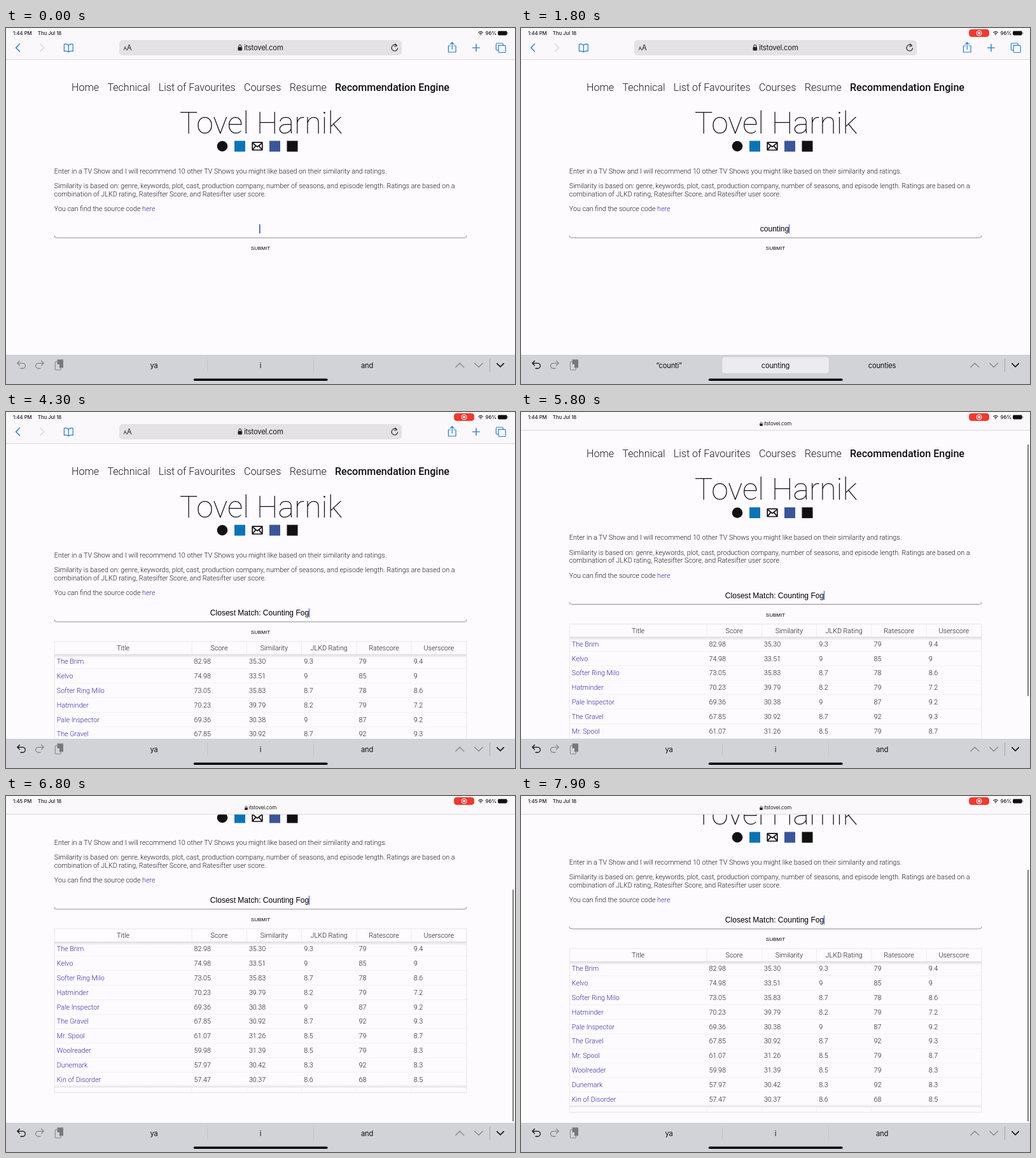
Animation, 800 px wide and 560 px high, one loop 8000 ms. Source, as an HTML page:

```html
<!DOCTYPE html>
<html lang="en">
<head>
<meta charset="utf-8">
<title>Recommendation Engine</title>
<style>
  html, body { margin: 0; width: 100%; height: 100%; overflow: hidden; background: #fefbfe; }
  svg { display: block; width: 800px; height: 560px; }
  text { white-space: pre; fill: #1c1b1d; }
  .body { font: 300 10.72px Roboto, sans-serif; }
  .nav { font: 300 16.08px Roboto, sans-serif; }
  .nav.on { font-weight: 500; fill: #0c0c0d; }
  .name { font: 100 48.2px Roboto, sans-serif; fill: #111; }
  .link { fill: #3529a8; }
  .field { font: 12.06px "Liberation Sans", Arial, sans-serif; fill: #000; }
  .submit { font: 8.04px "Liberation Sans", Arial, sans-serif; fill: #000; }
  .status { font: 500 7.8px Inter, sans-serif; letter-spacing: -.05px; }
  .url { font: 400 11.4px Inter, sans-serif; letter-spacing: -.25px; }
  .small { font: 400 8px Inter, sans-serif; letter-spacing: -.15px; }
  .hint { font: 400 11.2px Inter, sans-serif; letter-spacing: -.2px; fill: #111; }
  .mid { text-anchor: middle; }
  .line { fill: none; stroke-linecap: round; stroke-linejoin: round; }
</style>
</head>
<body>
<svg id="stage" viewBox="0 0 800 560">
  <defs>
    <linearGradient id="down" x1="0" y1="0" x2="0" y2="1">
      <stop offset="0" stop-color="#000" stop-opacity=".13"/>
      <stop offset="1" stop-color="#000" stop-opacity="0"/>
    </linearGradient>
    <linearGradient id="up" x1="0" y1="1" x2="0" y2="0">
      <stop offset="0" stop-color="#000" stop-opacity=".1"/>
      <stop offset="1" stop-color="#000" stop-opacity="0"/>
    </linearGradient>
  </defs>
  <rect width="800" height="560" fill="#fefbfe"/>

  <g id="page">
    <g id="nav"></g>
    <text class="name mid" x="400.5" y="165.6">Tovel Harnik</text>
    <circle cx="340" cy="186" r="8.3" fill="#111"/>
    <rect x="359" y="177.5" width="17" height="17" fill="#0c74b4"/>
    <g class="line" stroke="#111" stroke-width="1.7">
      <rect x="387.2" y="179.8" width="15.6" height="12.2" rx=".6"/>
      <path d="M387.6 181 L395 186.8 L402.4 181 M387.6 191.4 L392.6 185.4 M402.4 191.4 L397.4 185.4"/>
    </g>
    <rect x="414" y="177.5" width="17" height="17" fill="#3b5598"/>
    <rect x="441.5" y="177.5" width="17" height="17" fill="#111"/>
    <g id="copy"></g>
    <path d="M76 326.5 Q76 330 79.5 330 H720.5 Q724 330 724 326.5" fill="none" stroke="#8d8b90" stroke-width="1"/>
    <text id="field" class="field mid" x="398.5" y="320"></text>
    <rect id="caret" y="308.8" height="14.4" fill="#4560d2"/>
    <text class="submit mid" x="400" y="349.4">SUBMIT</text>
    <g id="table"></g>
  </g>
  <rect id="thumb" x="795.9" width="2.2" rx="1.1" fill="#828184"/>

  <rect id="bar" width="800" height="50" fill="#faf8fb"/>
  <rect id="edge" width="800" height=".8" fill="#d3d0d5"/>
  <text id="clock" class="status" x="11" y="11"></text>
  <text class="status" x="49.8" y="11">Thu Jul 18</text>
  <text class="status" x="753.6" y="11">96%</text>
  <g class="line" stroke="#222" stroke-width="1.1">
    <path d="M742.6 7.2 Q746 4 749.4 7.2 M744.2 8.9 Q746 7.2 747.8 8.9"/>
  </g>
  <circle cx="746" cy="10.5" r=".8" fill="#222"/>
  <rect x="773" y="4.8" width="14.6" height="6.6" rx="1.8" fill="#111"/>
  <rect x="788.3" y="6.9" width="1" height="2.4" rx=".5" fill="#777"/>
  <g id="pill">
    <rect x="704" y="2" width="32" height="12" rx="4.5" fill="#f0392f"/>
    <circle cx="720" cy="8" r="4" fill="none" stroke="#fff" stroke-width="1"/>
    <circle cx="720" cy="8" r="2" fill="#fff"/>
  </g>

  <g id="tools">
    <rect x="178" y="19" width="444" height="24" rx="5.5" fill="#e4e2e5"/>
    <g class="line" stroke="#2b7bd0" stroke-width="1.4">
      <path d="M21.5 25 L15.6 31 L21.5 37"/>
      <path d="M53.6 25 L59.5 31 L53.6 37" stroke="#d9d7db"/>
      <path d="M98.3 27 Q95 24.2 91.4 25.6 V36.6 Q95 35.3 98.3 37.8 Q101.6 35.3 105.2 36.6 V25.6 Q101.6 24.2 98.3 27 V37.6" stroke-width="1.2"/>
      <path d="M698.4 28 H695.4 V38 H707 V28 H704 M701.2 33.5 V23 M698.3 25.6 L701.2 22.6 L704.1 25.6" stroke-width="1.2"/>
      <path d="M738.9 25.5 V36.7 M733.3 31.1 H744.5"/>
      <path d="M774 27.4 H783.4 Q785.2 27.4 785.2 29.2 V36.7 Q785.2 38.5 783.4 38.5 H775.8 Q774 38.5 774 36.7 Z" stroke-width="1.2"/>
      <path d="M773.6 35 H772 Q770.3 35 770.3 33.3 V25.8 Q770.3 24 772 24 H779.6 Q781.3 24 781.3 25.8 V27" stroke-width="1.2"/>
      <path d="M614.4 28 A4.8 4.8 0 1 0 615.6 31.5 M611.6 24.8 L614.5 27.9 L610.8 29.2" stroke="#222" stroke-width="1.1"/>
    </g>
    <text class="small" x="184.4" y="35">A</text>
    <text class="url" x="189.8" y="35">A</text>
    <g id="lock">
      <rect x="364.5" y="30" width="6.6" height="5.6" rx="1" fill="#222"/>
      <path d="M365.9 30.4 V28.4 A1.9 1.9 0 0 1 369.7 28.4 V30.4" fill="none" stroke="#222" stroke-width="1.1"/>
    </g>
    <text class="url mid" x="404.8" y="35">itstovel.com</text>
  </g>
  <g id="compact">
    <use href="#lock" transform="translate(117.5 -1.6) scale(.707 .66)"/>
    <text class="small mid" x="403.2" y="21.2">itstovel.com</text>
  </g>

  <rect y="514" width="800" height="46" fill="#d1d3d9"/>
  <g class="line" stroke="#86888e" stroke-width="1.3">
    <path id="undo" d="M21.4 523.8 L17.8 527.3 L21.4 530.8 M18 527.3 H26.2 A4.1 4.1 0 0 1 26.2 535.5 H23"/>
    <path d="M55.6 523.8 L59.2 527.3 L55.6 530.8 M59 527.3 H50.8 A4.1 4.1 0 0 0 50.8 535.5 H54"/>
    <path d="M706.8 533.5 L713.2 527.3 L719.6 533.5 M736.6 527.3 L743 533.5 L749.4 527.3"/>
    <path d="M771.8 527.8 L777 533 L782.2 527.8" stroke="#111" stroke-width="1.7"/>
    <path d="M760.5 520.5 V540.5" stroke="#a5a7ad" stroke-width="1"/>
    <rect x="77.3" y="525" width="9" height="13" rx="1.2" stroke-width="1.1"/>
  </g>
  <path d="M80.5 521.5 H90 V534.5 H84 V529 H80.5 Z" fill="#76787e"/>
  <rect id="glow" x="316.3" y="517.8" width="167.4" height="25.2" rx="4" fill="#ecebf0"/>
  <path id="splits" d="M316.5 520.5 V540.5 M483.5 520.5 V540.5" stroke="#c1c3c9" stroke-width="1"/>
  <g id="hints"></g>
  <rect x="294.8" y="551.4" width="210.8" height="3.6" rx="1.8" fill="#000"/>
</svg>

<script>
const LOOP = 8000, STEP = 100;
const $ = id => document.getElementById(id);

function add(parent, tag, attrs, text) {
  const el = document.createElementNS('http://www.w3.org/2000/svg', tag);
  for (const key in attrs) el.setAttribute(key, attrs[key]);
  if (text) el.textContent = text;
  parent.appendChild(el);
  return el;
}
const label = (parent, cls, x, y, text) => add(parent, 'text', { class: cls, x, y }, text);
const box = (parent, x, y, width, height, fill) => add(parent, 'rect', { x, y, width, height, fill });
const show = (el, on) => el.setAttribute('opacity', +on);

[['Home', 103], ['Technical', 159.4], ['List of Favourites', 239.7], ['Courses', 374], ['Resume', 445.8]]
  .forEach(([text, x]) => label($('nav'), 'nav', x, 98.8, text));
label($('nav'), 'nav on', 517, 98.8, 'Recommendation Engine');

[
  ['Enter in a TV Show and I will recommend 10 other TV Shows you might like based on their similarity and ratings.', 228.7],
  ['Similarity is based on: genre, keywords, plot, cast, production company, number of seasons, and episode length. Ratings are based on a', 252.1],
  ['combination of JLKD rating, Ratesifter Score, and Ratesifter user score.', 264.9],
  ['You can find the source code ', 288.4]
].forEach(([text, y]) => label($('copy'), 'body', 75.8, y, text));
add($('copy').lastChild, 'tspan', { class: 'link' }, 'here');

// results table
const ROW = 22.85, TOP = 381, BOTTOM = TOP + 10 * ROW;
const colX = i => 292 + 86.3 * (i - 1);
const table = $('table');
const rows = `The Brim|82.98|35.30|9.3|79|9.4
Kelvo|74.98|33.51|9|85|9
Softer Ring Milo|73.05|35.83|8.7|78|8.6
Hatminder|70.23|39.79|8.2|79|7.2
Pale Inspector|69.36|30.38|9|87|9.2
The Gravel|67.85|30.92|8.7|92|9.3
Mr. Spool|61.07|31.26|8.5|79|8.7
Woolreader|59.98|31.39|8.5|79|8.3
Dunemark|57.97|30.42|8.3|92|8.3
Kin of Disorder|57.47|30.37|8.6|68|8.5`.split('\n');

box(table, 76, TOP, 648, 6, 'url(#down)');
box(table, 76, BOTTOM - 4, 648, 5, 'url(#up)');
rows.forEach((row, r) => {
  const y = TOP + r * ROW;
  if (r) box(table, 76, y - .4, 648, .8, '#f1eef2');
  row.split('|').forEach((text, c) =>
    label(table, c ? 'body' : 'body link', c ? colX(c) + 3.6 : 79.8, y + 15.2, text));
});
['Title', 'Score', 'Similarity', 'JLKD Rating', 'Ratescore', 'Userscore'].forEach((text, c) => {
  label(table, 'body mid', c ? colX(c) + 43.1 : 184, 375, text);
  if (c) {
    box(table, colX(c) - .4, 361, .8, 20, '#ece9ed');
    box(table, colX(c) - .4, BOTTOM, .8, 9, '#f1eef2');
  }
});
add(table, 'rect', { x: 76.4, y: 361, width: 647.4, height: 257.6, fill: 'none', stroke: '#e6e3e8', 'stroke-width': .9 });

const hints = [232.5, 400, 567.5].map(x => label($('hints'), 'hint mid', x, 534.5));

// field text by start time
const typing = [
  [0, ''], [600, 'c'], [800, 'co'], [1000, 'cou'], [1200, 'coun'], [1400, 'count'], [1500, 'counti'],
  [1700, 'counting'], [2200, 'counting f'], [2400, 'counting fo'], [2600, 'counting fog'],
  [3700, 'Closest Match: Counting Fog']
];
const scroll = [
  [5300, 0], [5500, 6], [5800, 27.5], [6000, 69], [6300, 124], [6500, 143], [6700, 151],
  [6800, 152], [7000, 149], [7200, 136], [7400, 125], [7600, 121]
];
const END = 121;

function valueAt(keys, t) {
  if (t <= keys[0][0]) return keys[0][1];
  for (let i = 1; i < keys.length; i++) {
    const [t0, a] = keys[i - 1], [t1, b] = keys[i];
    if (t < t1) return a + (b - a) * (t - t0) / (t1 - t0);
  }
  return keys[keys.length - 1][1];
}

function suggestions(t, text) {
  if (t >= 600 && t < 2000) return [`“${text.slice(0, 6)}”`, 'counting', 'counties'];
  return ['ya', 'i', 'and'];
}

function drawText(t) {
  const text = typing.filter(k => k[0] <= t).pop()[1];
  const field = $('field');
  field.textContent = text;
  const half = text ? field.getComputedTextLength() / 2 : 0;
  $('caret').setAttribute('x', 398.5 + half - (text ? .3 : .6));
  $('caret').setAttribute('width', text ? 1.2 : 1.8);
  suggestions(t, text).forEach((word, i) => hints[i].textContent = word);
  const picked = t >= 1500 && t < 2000;
  show($('glow'), picked);
  show($('splits'), !picked);
  $('undo').setAttribute('stroke', text ? '#111' : '#86888e');
}

function drawScroll(t) {
  const s = valueAt(scroll, t), p = Math.min(1, s / 27.5);
  const h = 50 - 21 * p;
  $('page').setAttribute('transform', `translate(0 ${-s})`);
  $('bar').setAttribute('height', h);
  $('edge').setAttribute('y', h - .6);
  $('tools').setAttribute('transform', `translate(0 ${-13 * p})`);
  show($('tools'), Math.max(0, 1 - 1.6 * p));
  show($('compact'), Math.max(0, 2 * p - 1));
  // the thumb is squeezed against the bottom while overscrolled
  const top = 116 + (s - END) * (s > END ? 1 : .695);
  $('thumb').setAttribute('y', top);
  $('thumb').setAttribute('height', Math.min(512, top + 396) - top);
  show($('thumb'), s > 0);
}

let last = -1;
function frame(now) {
  const t = Math.floor((now % LOOP) / STEP) * STEP;
  if (t !== last) {
    last = t;
    drawText(t);
    drawScroll(t);
    show($('table'), t >= 3700);
    show($('pill'), t >= 500);
    $('clock').textContent = t < 6600 ? '1:44 PM' : '1:45 PM';
  }
  requestAnimationFrame(frame);
}
frame(performance.now());
</script>
</body>
</html>
```
